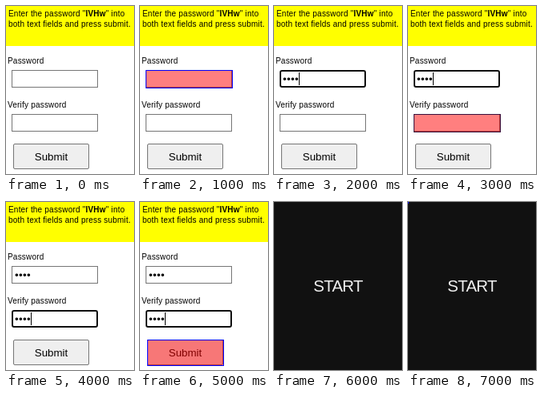
Animation of 160 by 210 pixels, one loop 8 s. Source, as an HTML page:

```html
<!DOCTYPE html>
<html lang="en">
<head>
<meta charset="utf-8">
<title>Enter password</title>
<style>
html, body { margin: 0; width: 100%; height: 100%; overflow: hidden; background: #fff; }
#stage { position: relative; width: 160px; height: 210px; overflow: hidden; background: #fff;
  font: 10px/13px "Liberation Sans", Arial, sans-serif; letter-spacing: .2px; color: #000; }
#stage * { position: absolute; box-sizing: border-box; white-space: pre; }
#stage b { position: static; }
#query { left: 0; top: 0; width: 160px; height: 50px; padding: 3px; background: #ff0; }
.label { left: 2px; }
.field { left: 7px; width: 108px; height: 22px; border: 1px solid #767676; background: #fff; }
.focus { border: 2px solid #101010; border-radius: 3px; }
.dots { left: 11px; font-size: 13.333px; line-height: 16px; letter-spacing: .33px; }
.caret { left: 31px; width: 1px; height: 16px; background: #000; }
#submit { left: 9px; top: 172px; width: 95px; height: 32px; border: 1px solid #767676; border-radius: 2px;
  background: #efefef; font-size: 13.333px; line-height: 31px; letter-spacing: 0; text-align: center; }
.mark { background: rgba(255, 0, 0, .5); border: 1px solid #00f; }
#markVerify { border-color: #38103c; }
#cover { inset: 0; background: #111; color: #eee; font-size: 20.5px; line-height: 209px;
  letter-spacing: -.8px; text-align: center; }
#corner { left: 0; top: 0; width: 1px; height: 2px; background: #00f; }
</style>
</head>
<body>
<div id="stage">
  <div id="query">Enter the password "<b>IVHw</b>" into
both text fields and press submit.</div>
  <div class="label" style="top:62px">Password</div>
  <div class="field" id="first" style="top:80px"></div>
  <div class="dots" id="firstDots" style="top:84px">••••</div>
  <div class="caret" id="firstCaret" style="top:83px"></div>
  <div class="label" style="top:117px">Verify password</div>
  <div class="field" id="verify" style="top:135px"></div>
  <div class="dots" id="verifyDots" style="top:139px">••••</div>
  <div class="caret" id="verifyCaret" style="top:138px"></div>
  <div id="submit">Submit</div>
  <div class="mark" id="markFirst" style="left:7px;top:80px;width:109px;height:23px"></div>
  <div class="mark" id="markVerify" style="left:7px;top:135px;width:109px;height:23px"></div>
  <div class="mark" id="markSubmit" style="left:9px;top:172px;width:96px;height:33px"></div>
  <div id="cover">START</div>
  <div id="corner"></div>
</div>
<script>
const STEP = 1000, COUNT = 8;
const $ = id => document.getElementById(id);

// Steps during which each part is visible: [from, to)
const visible = {
  firstDots: [2, 6], firstCaret: [2, 4],
  verifyDots: [4, 6], verifyCaret: [4, 6],
  markFirst: [1, 2], markVerify: [3, 4], markSubmit: [5, 6],
  cover: [6, 8], corner: [7, 8]
};
const focused = { first: [2, 4], verify: [4, 6] };
const within = (step, [from, to]) => step >= from && step < to;

function draw(step) {
  for (const id in visible) $(id).style.visibility = within(step, visible[id]) ? 'visible' : 'hidden';
  for (const id in focused) $(id).classList.toggle('focus', within(step, focused[id]));
}

const start = performance.now();
function tick() {
  draw(Math.floor((performance.now() - start) / STEP) % COUNT);
  requestAnimationFrame(tick);
}
tick();
</script>
</body>
</html>
```
